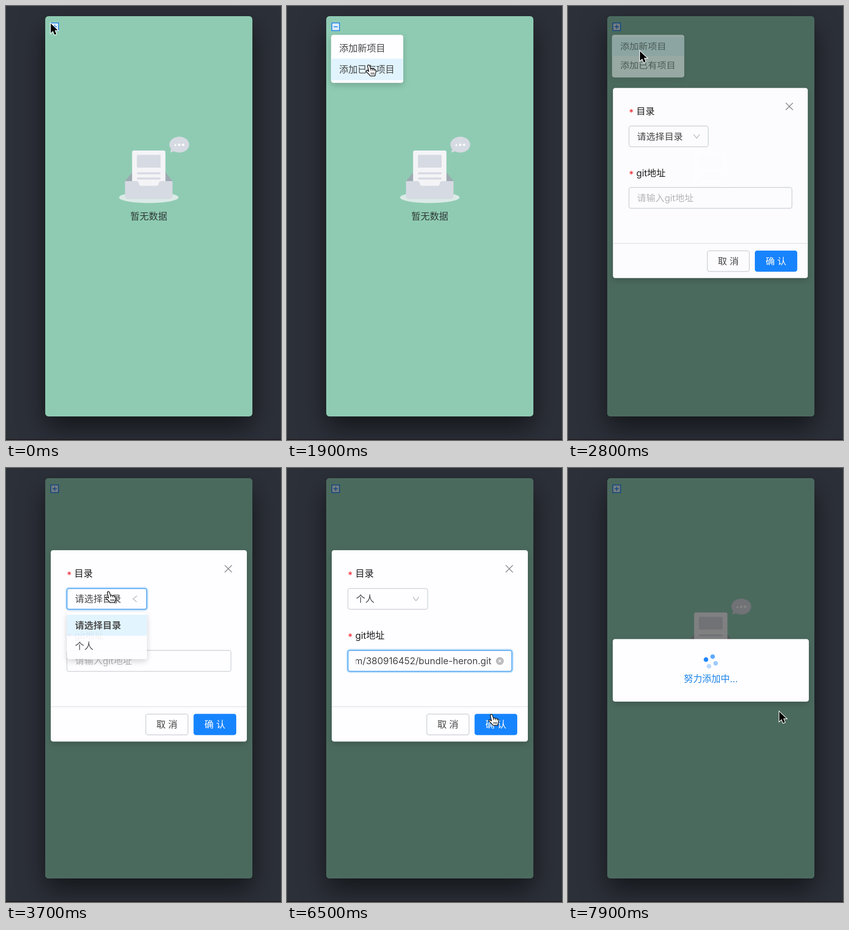
An HTML page that plays this animation: 596 px wide and 940 px high, repeating every 8 s.

```html
<!DOCTYPE html>
<html lang="zh">
<head>
<meta charset="utf-8">
<style>
  html, body { margin: 0; width: 100%; height: 100%; overflow: hidden; background: #2c3039; }
  .panel {
    position: absolute; left: 85px; top: 22px; width: 449px; height: 867px; border-radius: 7px;
    background: #8fcbb3; box-shadow: 0 0 1px rgba(0,0,0,.6), 0 25px 56px rgba(0,0,0,.54);
  }
  svg { position: absolute; left: 0; top: 0; width: 596px; height: 940px; }
  text { font: 20px Inter, "Noto Sans CJK SC", "Noto Sans CJK", sans-serif; fill: #464646; white-space: pre; }
  .card { fill: #fefdff; filter: drop-shadow(0 5px 7px rgba(0,0,0,.18)); }
  .field { fill: #fefdff; stroke: #cbd0d8; stroke-width: 1.5; }
  .focus { fill: none; }
  .focus .ring { stroke: #1890ff; stroke-opacity: .22; stroke-width: 5; }
  .focus .edge { stroke: #3f9ef2; stroke-width: 1.6; }
  .star { fill: #f0222d; }
  .label { fill: #1c1c1c; }
  .hint { fill: #b6b6b8; }
  .mid { text-anchor: middle; }
  .hover { fill: #e1f4fe; }
  .line { fill: none; stroke-width: 1.6; }
</style>
</head>
<body>
<div class="panel"></div>
<svg viewBox="0 0 596 940">
  <rect y="938.5" width="596" height="1.5" fill="#1c151a"/>

  <g transform="translate(222.2 283) scale(.95)" fill="#d6dae2">
    <ellipse cx="91.8" cy="138.6" rx="67.8" ry="12.7" fill="#f5f5f7" fill-opacity=".75"/>
    <path d="M37.6 101.3L61.5 72h61l23.500 29.300V117H37.600z" fill="#9daab1"/>
    <rect x="53.800" y="31.700" width="76" height="101" rx="4" fill="#f4f4f7"/>
    <rect x="64.700" y="41.600" width="54.200" height="29" rx="2"/>
    <rect x="64.700" y="81.400" width="54.200" height="4.500" rx="2.200"/>
    <rect x="64.700" y="93.200" width="54.200" height="4.500" rx="2.200"/>
    <path d="M37.600 101.300h26.300a5.300 5.400 0 0 1 5.200 5.400a5.300 5.400 0 0 0 5.300 5.400h34.800a5.300 5.400 0 0 0 5.300-5.400a5.300 5.400 0 0 1 5.200-5.400h26.300v33.600a7 7 0 0 1-7 7.200H44.600a7 7 0 0 1-7-7.200z"/>
    <path d="M149.100 33.300l-6.800 2.600a1 1 0 0 1-1.300-1.200l1.900-6.200A22.600 18.100 0 1 1 149.100 33.300z"/>
    <path d="M155.300 21h-5.700l2.900-4.900zM158.900 16.100h5v4.900h-5zM167.500 18.500a2.800 2.800 0 1 0 5.600 0a2.800 2.800 0 1 0-5.600 0z" fill="#fff"/>
  </g>
  <text class="mid" x="309.5" y="463" style="fill:#2f3a36">暂无数据</text>

  <g stroke="#1f83ee" stroke-width="1.8">
    <rect x="97.200" y="36.700" width="16.600" height="16.600" fill="#dcecf7"/>
    <path d="M101 45h9"/>
    <path id="plusBar" d="M105.500 40.500v9"/>
  </g>

  <rect id="mask" x="85" y="22" width="449" height="867" rx="7"/>

  <g id="menu">
    <rect class="card" x="95.500" y="62.500" width="156.500" height="104" rx="5"/>
    <rect class="hover" id="menu1" x="95.500" y="68" width="156.500" height="46.300"/>
    <rect class="hover" id="menu2" x="95.500" y="114.300" width="156.500" height="46.300"/>
    <text x="113" y="98.600">添加新项目</text>
    <text x="113" y="144.800">添加已有项目</text>
  </g>

  <g id="form">
    <rect class="card" x="97" y="178" width="425" height="414.500" rx="5"/>
    <path class="line" d="M474 210.500l15.500 15.500M489.500 210.500L474 226" stroke="#808083"/>
    <path d="M97 517h425" stroke="#e3e3e8" stroke-width="1.400"/>
    <text class="star" x="132" y="239">*</text>
    <text class="label" x="148" y="236">目录</text>
    <rect class="field" x="132" y="261" width="173" height="45" rx="4.500"/>
    <g class="focus" id="selectFocus">
      <rect class="ring" x="131" y="260" width="175" height="47" rx="5.500"/>
      <rect class="edge" x="132" y="261" width="173" height="45" rx="4.500"/>
    </g>
    <text id="choice" x="149.500" y="291"></text>
    <path class="line" id="arrow" d="M-6.500-4L0 4L6.500-4" stroke="#b9b9bd"/>

    <text class="star" x="132" y="373.500">*</text>
    <text class="label" x="148" y="370.500">git地址</text>
    <rect class="field" x="132" y="395" width="355.500" height="45.500" rx="4.500"/>
    <g class="focus" id="inputFocus">
      <rect class="ring" x="131" y="394" width="357.500" height="47.500" rx="5.500"/>
      <rect class="edge" x="132" y="395" width="355.500" height="45.500" rx="4.500"/>
    </g>
    <text class="hint" id="hint" x="149.500" y="425.500">请输入git地址</text>
    <g id="address">
      <svg x="149" y="396" width="296" height="44" style="width:296px;height:44px">
        <text x="294" y="29" text-anchor="end">com/380916452/bundle-heron.git</text>
      </svg>
      <circle cx="461.300" cy="418" r="8.600" fill="#bcbcbf"/>
      <path d="M458.500 415.200l5.600 5.600M464.100 415.200l-5.600 5.600" stroke="#fff" stroke-width="1.400"/>
    </g>
    <path id="caret" d="M0 405v25" stroke="#222" stroke-width="1.300"/>

    <rect class="field" x="303" y="533" width="91.500" height="45" rx="4.500"/>
    <text class="mid" x="348.700" y="562.700">取 消</text>
    <rect x="406.500" y="532.500" width="92.500" height="46" rx="5" fill="#1784ff"/>
    <text class="mid" x="452.700" y="562.700" style="fill:#fff">确 认</text>
  </g>

  <g id="drop">
    <rect class="card" x="132" y="312" width="173.500" height="103" rx="5"/>
    <rect class="hover" id="drop1" x="132" y="318" width="173.500" height="45.700"/>
    <rect class="hover" id="drop2" x="132" y="363.700" width="173.500" height="45.700"/>
    <text x="149.500" y="348.500" font-weight="600" style="font-weight:600">请选择目录</text>
    <text x="149.500" y="394.200">个人</text>
  </g>

  <g id="loading">
    <rect class="card" x="97" y="370.500" width="425" height="135.500" rx="5"/>
    <g id="dots" fill="#1784ff"></g>
    <text class="mid" x="309.500" y="464.500" style="fill:#1c84e8">努力添加中...</text>
  </g>

  <g id="cursor">
    <path id="pointer" d="M0 0V20.500L4.800 16L8.300 24.300L12 22.700L8.600 14.600H15.300Z" stroke="#fff" stroke-width="2.600" paint-order="stroke"/>
    <g id="hand" stroke="#111" stroke-width="1.500" stroke-linejoin="round">
      <path d="M-2.400 2C-2.400-.8 1.500-.8 2.300 1.600L4.400 8C6 6.800 8 7.400 8.600 8.800C10 7.800 12 8.400 12.500 9.800C14.500 9.200 16 10.500 15.800 13C15.800 17 14.500 18.500 13.500 23.500H3.500C1.500 20-1.500 18-5 14.500C-6.800 12.300-4.500 10.500-2.500 12L.3 13.800Z" fill="#fff"/>
      <path d="M4.400 8l1 4M8.600 8.800l.8 3.600M12.500 9.800l.5 3.200M5.500 16v4.500M8.500 16v4.500M11.300 16v4.500" fill="none" stroke-width="1.200"/>
    </g>
    <g id="beam" fill="none">
      <path d="M-4.500-11q3.500 0 4.500 2.500q1-2.500 4.500-2.500M0-8.500V8.500M-4.500 11q3.500 0 4.500-2.500q1 2.500 4.500 2.500M-3 3h6" stroke="#fff" stroke-width="3.500"/>
      <path d="M-4.500-11q3.500 0 4.500 2.500q1-2.500 4.500-2.500M0-8.500V8.500M-4.500 11q3.500 0 4.500-2.500q1 2.500 4.500 2.500M-3 3h6" stroke="#111" stroke-width="1.600"/>
    </g>
  </g>
</svg>
<script>
const LOOP = 8000, STEP = 100;
const MENU_OPEN = 60, MENU_CLOSE = 2616, FORM_OPEN = 2578;
const DROP_OPEN = 3610, PICK = 4350, FOCUS = 5180, PASTE = 5700, CONFIRM = 6930;

const el = {};
document.querySelectorAll('[id]').forEach(node => el[node.id] = node);
const dots = [0, 1, 2, 3].map(() => {
  const dot = document.createElementNS('http://www.w3.org/2000/svg', 'circle');
  dot.setAttribute('r', 4.9);
  return el.dots.appendChild(dot);
});

// Cursor stops: time, x, y
const path = [
  [0, 97, 38], [550, 97, 38], [1000, 150, 88], [1500, 177, 128], [1900, 177, 128], [2300, 157, 99],
  [2850, 156, 98], [3400, 222, 268], [3700, 222, 268], [4150, 190, 382], [4450, 190, 382],
  [5050, 238, 425], [5900, 238, 425], [6400, 443, 534], [6950, 443, 534], [7400, 458, 528], [8000, 458, 528]
];

const ramp = (t, start, length) => Math.min(1, Math.max(0, (t - start) / length));
const mix = (a, b, k) => a + (b - a) * k;

function bezier(x1, y1, x2, y2) {
  const at = (a, b, s) => 3 * (1 - s) ** 2 * s * a + 3 * (1 - s) * s * s * b + s ** 3;
  return x => {
    let lo = 0, hi = 1;
    for (let i = 0; i < 24; i++) {
      const s = (lo + hi) / 2;
      if (at(x1, x2, s) < x) lo = s; else hi = s;
    }
    return at(y1, y2, hi);
  };
}
const ease = bezier(.25, .1, .25, 1), smooth = bezier(.45, 0, .4, 1);
const quintOut = bezier(.23, 1, .32, 1), quintIn = bezier(.755, .05, .855, .06);
const circOut = bezier(.08, .82, .17, 1), circInOut = bezier(.78, .14, .15, .86);

const fade = (node, opacity) => {
  node.style.opacity = opacity;
  node.style.display = opacity > 0 ? '' : 'none';
};
const place = (node, x, y, sx, sy, opacity) => {
  node.setAttribute('transform', `translate(${x} ${y}) scale(${sx} ${sy}) translate(${-x} ${-y})`);
  fade(node, opacity);
};
const slide = (node, x, y, t, open, close) => {
  const k = quintOut(ramp(t, open, 200)) * (1 - quintIn(ramp(t, close, 200)));
  place(node, x, y, 1, .8 + .2 * k, k);
};
const zoom = (node, x, y, t, open, close) => {
  const k = circOut(ramp(t, open, 300)) * (1 - circInOut(ramp(t, close, 200)));
  place(node, x, y, .2 + .8 * k, .2 + .8 * k, k);
};

function cursorAt(t) {
  const i = path.findIndex(stop => stop[0] > t);
  const [t0, x0, y0] = path[i - 1], [t1, x1, y1] = path[i];
  const k = smooth((t - t0) / (t1 - t0));
  return [mix(x0, x1, k), mix(y0, y1, k)];
}

function draw(t) {
  const [x, y] = cursorAt(t);
  const over = (l, top, r, b) => x >= l && x < r && y >= top && y < b;
  const menuLive = t >= MENU_OPEN && t < FORM_OPEN;
  const formLive = t >= FORM_OPEN && t < CONFIRM;
  const dropLive = t >= DROP_OPEN && t < PICK;

  fade(el.plusBar, menuLive ? 0 : 1);
  slide(el.menu, 95.5, 62.5, t, MENU_OPEN, MENU_CLOSE);
  fade(el.menu1, +over(95, 68, 252, 114.3));
  fade(el.menu2, +over(95, 114.3, 252, 161));

  const mask1 = ramp(t, FORM_OPEN, 200) - ramp(t, CONFIRM, 200), mask2 = ramp(t, CONFIRM, 200);
  fade(el.mask, 1 - (1 - .48 * mask1) * (1 - .48 * mask2));
  zoom(el.form, 160, 97, t, FORM_OPEN, CONFIRM);

  const overSelect = formLive && over(132, 261, 305, 306);
  const selectFocus = ease(ramp(t, DROP_OPEN - 60, 200)) - ease(ramp(t, FOCUS, 300));
  fade(el.selectFocus, Math.max(selectFocus, overSelect ? .6 : 0));
  el.choice.textContent = t < PICK ? '请选择目录' : '个人';
  const turn = 180 * (ease(ramp(t, DROP_OPEN, 300)) - ease(ramp(t, PICK, 300)));
  el.arrow.setAttribute('transform', `translate(279.5 283.5) rotate(${turn})`);
  slide(el.drop, 132, 312, t, DROP_OPEN, PICK);
  const second = over(132, 363.7, 305, 410);
  fade(el.drop1, +!second);
  fade(el.drop2, +second);

  const pasted = t >= PASTE;
  fade(el.inputFocus, ease(ramp(t, FOCUS, 200)));
  fade(el.hint, +!pasted);
  fade(el.address, +pasted);
  const blink = (t - (pasted ? PASTE : FOCUS)) % 1000 < 520;
  fade(el.caret, t >= FOCUS && t < CONFIRM && blink ? 1 : 0);
  el.caret.setAttribute('transform', `translate(${pasted ? 444 : 149.8} 0)`);

  zoom(el.loading, 443, 534, t, CONFIRM, LOOP);
  const spin = Math.max(0, t - CONFIRM) / 1000;
  dots.forEach((dot, i) => {
    const angle = (270 + 90 * i + 300 * spin) * Math.PI / 180;
    const age = Math.max(0, spin - .4 * i);
    dot.setAttribute('cx', 309.5 + 11.2 * Math.cos(angle));
    dot.setAttribute('cy', 419 + 11.2 * Math.sin(angle));
    dot.style.opacity = .3 + .7 * (1 - Math.abs(1 - age % 2));
  });

  const onButton = over(406, 532, 499, 579);
  const kind = menuLive && over(95, 68, 252, 161) || overSelect || dropLive && over(132, 312, 305, 415) || formLive && onButton
    ? 'hand' : formLive && over(132, 395, 488, 441) ? 'beam' : 'pointer';
  for (const name of ['pointer', 'hand', 'beam']) fade(el[name], +(name === kind));
  el.cursor.setAttribute('transform', `translate(${x} ${y})`);
}

const begin = performance.now();
function tick() {
  const t = (performance.now() - begin) % LOOP;
  draw(Math.floor(t / STEP) * STEP);
  requestAnimationFrame(tick);
}
tick();
</script>
</body>
</html>
```
